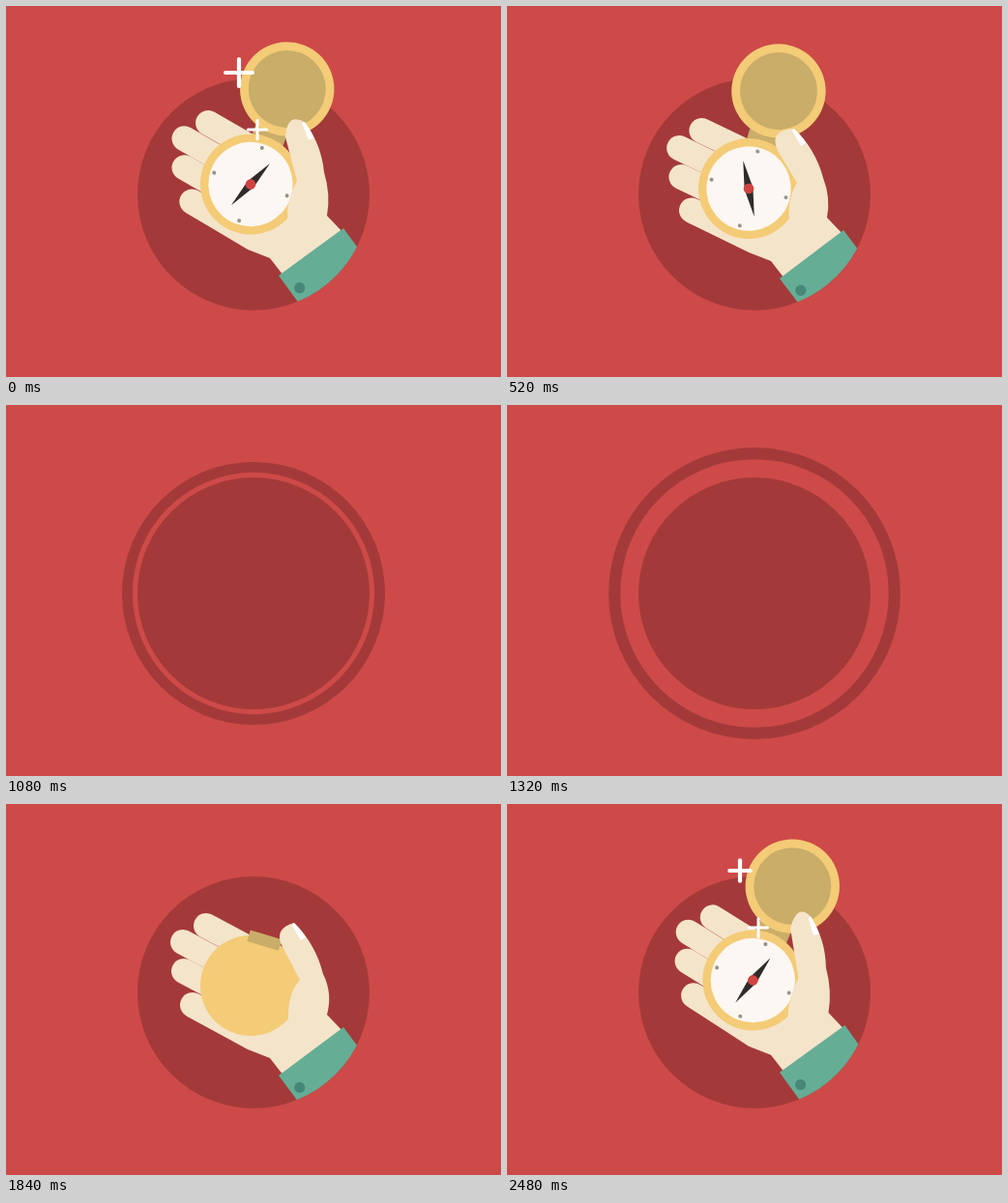
Animation, 512 px wide and 384 px high, one loop 2520 ms. Source, as an HTML page with a canvas:

```html
<!DOCTYPE html>
<html>
<head>
<meta charset="utf-8">
<style>
html, body { margin: 0; width: 100%; height: 100%; overflow: hidden; background: #cd4a48; }
canvas { display: block; }
</style>
</head>
<body>
<canvas id="stage" width="512" height="384"></canvas>
<script>
const ctx = document.getElementById('stage').getContext('2d');
const LOOP = 2520, TAU = Math.PI * 2, RAD = Math.PI / 180;
const BG = '#cd4a48', DARK = '#a33a39', SKIN = '#f4e4ca', GOLD = '#f4cb76',
      TAN = '#c9ad69', CUFF = '#66ad96', BUTTON = '#47877a', FACE = '#fcf7f2';

// compass x, y, angle | finger shift, angle, spread | cuff left, right | thumb outline
const ENTER = [231, 193, 8, 0, 18, 1, 276, 282, 333, 221,
  263, 122, 246, 133, 254, 149, 281, 180, 269, 198, 279, 222, 317, 185, 302, 168];
const HOLD = [253, 188, 17, 0, 28, 0, 282, 281, 349, 231,
  298, 123, 279, 128, 284, 144, 304, 182, 291, 196, 292, 224, 338, 196, 328, 176];
const DIP = [218, 231, -20, 6, 2, 0, 278, 307, 337, 250,
  240, 192, 234, 204, 246, 209, 266, 209, 270, 228, 270, 240, 308, 196, 284, 187];
const OPEN = [253, 184.5, 21, 0, 30, 0, 282, 279, 349, 230,
  309, 120, 291, 110, 289, 135, 301, 181, 290, 200, 291, 222, 336, 195, 329, 172];
const REST = [250, 189, 17, 0, 25.5, 0, 282, 282, 348, 232,
  297, 127, 270, 128, 280, 150, 300, 183, 290, 198, 292, 222, 335, 198, 327, 178];
const TIPS = [[-46, -62], [-70, -45], [-69, -15], [-60, 20]];
const SPREAD = [[6, -13], [3, -7], [0, 0], [0, 0]];

const span = (t, a, b) => Math.min(1, Math.max(0, (t - a) / (b - a)));
const inOut = p => p * p * (3 - 2 * p);
const out = p => 1 - (1 - p) ** 2;
const mix = (a, b, k) => a.map((v, i) => v + (b[i] - v) * k);
const settle = t => mix(OPEN, REST, 1 - Math.exp(-t / 105));

function disc(x, y, r, color) {
  ctx.fillStyle = color;
  ctx.beginPath();
  ctx.arc(x, y, r, 0, TAU);
  ctx.fill();
}

function poly(points, color) {
  ctx.fillStyle = color;
  ctx.beginPath();
  points.forEach(p => ctx.lineTo(...p));
  ctx.fill();
}

function line(a, b, width, color, cap) {
  ctx.strokeStyle = color;
  ctx.lineWidth = width;
  ctx.lineCap = cap;
  ctx.beginPath();
  ctx.moveTo(...a);
  ctx.lineTo(...b);
  ctx.stroke();
}

function poseAt(t) {
  if (t < 1000) return settle(t);
  if (t < 1900) return mix(ENTER, HOLD, out(span(t, 1520, 1840)));
  if (t < 2260) return mix(HOLD, DIP, inOut(span(t, 1960, 2240)));
  if (t < 2480) return mix(DIP, settle(-40), inOut(span(t, 2260, 2480)));
  return settle(t - LOOP);
}

function drawFingers([cx, cy, , shift, angle, spread]) {
  const turn = (angle - 28) * RAD, c = Math.cos(turn), s = Math.sin(turn);
  const dir = angle * RAD;
  let last;
  TIPS.forEach(([x, y], i) => {
    const px = cx + shift + x * c - y * s, py = cy + x * s + y * c;
    const tip = [px + SPREAD[i][0] * spread, py + SPREAD[i][1] * spread];
    line(tip, [px + 60 * Math.cos(dir), py + 60 * Math.sin(dir)], 26, SKIN, 'round');
    last = [px - 13 * Math.sin(dir), py + 13 * Math.cos(dir)];
  });
  return last;
}

function wristOf([, , , , , , lx, ly, rx, ry]) {
  const d = Math.hypot(rx - lx, ry - ly), ux = (rx - lx) / d, uy = (ry - ly) / d;
  return (u, v) => [lx + ux * u - uy * v, ly + uy * u + ux * v];
}

function drawPalm(pose, pinky, wrist) {
  const [cx, cy, , , , , lx, ly, rx, ry] = pose;
  const d = Math.hypot(rx - lx, ry - ly);
  poly([pinky, [lx - 32, ly - 27], [lx - 9, ly - 18], wrist(4, 3), wrist(d - 3, 3),
    [rx - 17, ry - 13], [cx, cy]], SKIN);
}

function drawCompass([cx, cy, angle], lid, needle, glint) {
  ctx.save();
  ctx.translate(cx, cy);
  ctx.rotate(angle * RAD);
  ctx.fillStyle = TAN;
  if (lid > -1) ctx.fillRect(-17, -67, 34, 24);
  disc(0, 0, 52, GOLD);
  if (lid > -1) {
    disc(0, 0, 43.7, FACE);
    for (let i = 0; i < 4; i++) {
      const a = (i * 90 - 3.5) * RAD;
      disc(39.5 * Math.sin(a), -39.5 * Math.cos(a), 2, '#98928c');
    }
    ctx.save();
    ctx.rotate((needle - angle) * RAD);
    poly([[0, -29.5], [4.5, 0], [0, 29.5], [-4.5, 0]], '#302b29');
    ctx.restore();
    disc(0, 0, 5.3, '#cf4341');
    ctx.save();
    ctx.translate(0, -52.8 - 52.8 * lid);
    ctx.scale(1, Math.max(0.02, Math.abs(lid)));
    disc(0, 0, 48.7, GOLD);
    if (lid > 0) disc(0, 0, 40, TAN);
    ctx.restore();
  } else {
    ctx.fillStyle = TAN;
    ctx.fillRect(-17, -55, 34, 12);
  }
  ctx.restore();
  if (glint > 0) {
    ctx.globalAlpha = glint;
    ctx.fillStyle = '#fff';
    ctx.beginPath();
    ctx.arc(cx, cy, 44, 0.57, 2.02);
    ctx.quadraticCurveTo(cx + 15, cy + 46, cx + 37, cy + 23.7);
    ctx.fill();
    ctx.globalAlpha = 1;
  }
}

function drawThumb(pose) {
  const [lx, ly, rx, ry, ...n] = pose.slice(6);
  const [ax, ay] = n, [bx, by] = n.slice(14);
  const dx = ax - bx, dy = ay - by, d = Math.hypot(dx, dy);
  ctx.save();
  ctx.fillStyle = SKIN;
  ctx.beginPath();
  ctx.moveTo(ax, ay);
  ctx.quadraticCurveTo(...n.slice(2, 6));
  ctx.lineTo(n[6], n[7]);
  ctx.quadraticCurveTo(...n.slice(8, 12));
  ctx.lineTo((lx + rx) / 2, (ly + ry) / 2);
  ctx.lineTo(rx - 17, ry - 13);
  ctx.quadraticCurveTo(n[12], n[13], bx, by);
  ctx.quadraticCurveTo((ax + bx) / 2 - dy * 0.14, (ay + by) / 2 + dx * 0.14, ax, ay);
  ctx.fill();
  ctx.clip();
  line([ax, ay], [ax - dx / d * 19, ay - dy / d * 19], 6, '#fff', 'butt');
  ctx.restore();
}

function drawCuff(pose, wrist) {
  const d = Math.hypot(pose[8] - pose[6], pose[9] - pose[7]);
  poly([wrist(0, 0), wrist(d, 0), wrist(d, 90), wrist(0, 90)], CUFF);
  disc(...wrist(10, 23), 5.6, BUTTON);
}

function drawHand(t) {
  const pose = poseAt(t);
  const away = t < 1000 ? span(t, 550, 720) ** 2 : (1 - span(t, 1350, 1520)) ** 2;
  const since = t > 1260 ? t - LOOP : t;
  const lid = t < 1000 ? 1 : 2 * inOut(span(t, 2300, 2470)) - 1;
  const needle = 45 * Math.cos(Math.PI * (since - 50) / 500) * Math.exp(-Math.max(0, since) / 380);
  const glint = Math.min(span(t, 2140, 2200), 1 - span(t, 2260, 2310));

  // the hand may leave the disc everywhere but at the lower right
  ctx.save();
  ctx.beginPath();
  ctx.rect(0, 0, 376, 195);
  ctx.rect(0, 0, 220, 300);
  ctx.moveTo(376, 195);
  ctx.arc(256, 195, 120, 0, TAU);
  ctx.clip();
  ctx.translate(250 * away, 280 * away);
  const wrist = wristOf(pose);
  drawPalm(pose, drawFingers(pose), wrist);
  drawCompass(pose, lid, needle, glint);
  drawThumb(pose);
  drawCuff(pose, wrist);
  ctx.restore();
}

function drawSpark(x, y, size, width, p) {
  if (p <= 0 || p >= 1) return;
  const r = size * Math.sin(Math.PI * p);
  line([x - r, y], [x + r, y], width, '#fff', 'round');
  line([x, y - r], [x, y + r], width, '#fff', 'round');
}

function drawRing(t) {
  const p = span(t, 890, 1530);
  if (p <= 0 || p >= 1) return;
  const outer = 120 + 35.5 * Math.sin(p * Math.PI / 2);
  const inner = Math.min(outer, 120 + 35.5 * p ** 1.6);
  disc(256, 195, outer, DARK);
  disc(256, 195, inner, BG);
}

function draw(t) {
  ctx.fillStyle = BG;
  ctx.fillRect(0, 0, 512, 384);
  drawRing(t);
  disc(256, 195, 120 - 1.7 * Math.sin(Math.PI * span(t, 1400, 1660)), DARK);
  if (t < 720 || t > 1350) drawHand(t);
  const since = t > 1260 ? t - LOOP : t;
  drawSpark(241, 69, 15, 4.2, span(since, -120, 200));
  drawSpark(260, 128, 10, 3, span(since, -140, 110));
}

const start = performance.now();
function tick() {
  draw((performance.now() - start) % LOOP);
  requestAnimationFrame(tick);
}
tick();
</script>
</body>
</html>
```
